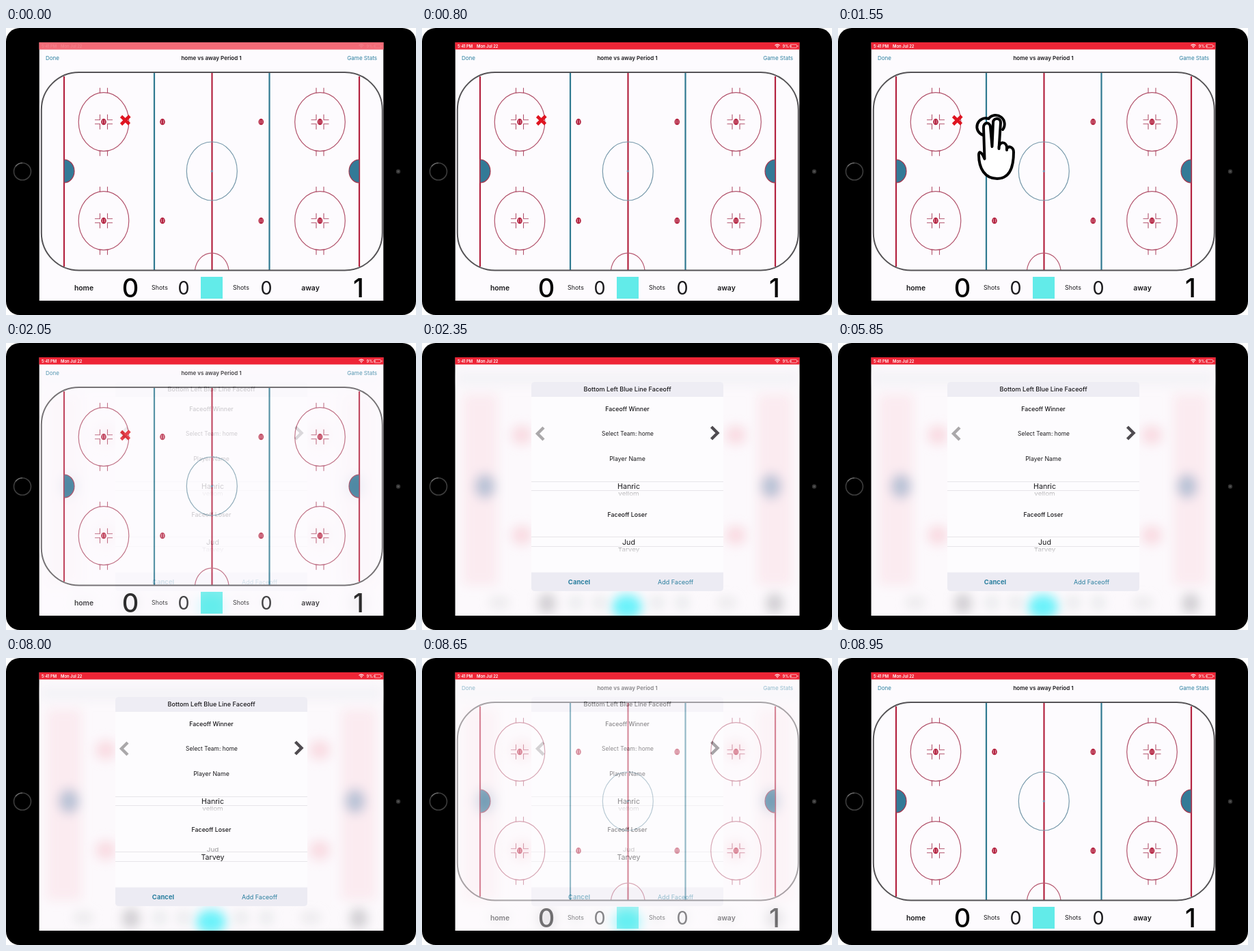
An HTML page for the animation above (9 s loop, 600x421 px).

```html
<!DOCTYPE html>
<html lang="en">
<head>
<meta charset="utf-8">
<title>Hockey faceoff tracker</title>
<style>
html, body { margin: 0; width: 100%; height: 100%; overflow: hidden; background: #fff; }
svg { display: block; width: 600px; height: 421px; }
text { font-family: Inter, Roboto, "Open Sans", sans-serif; }
.line { fill: none; }
</style>
</head>
<body>
<svg viewBox="0 0 600 421">
  <defs>
    <filter id="soft" x="-50%" y="-50%" width="200%" height="200%"><feGaussianBlur stdDeviation="8"/></filter>
    <linearGradient id="fade" x2="0" y2="1">
      <stop offset="0" stop-color="#fdfcfe" stop-opacity="0"/>
      <stop offset="1" stop-color="#fdfcfe"/>
    </linearGradient>
    <clipPath id="screen"><rect x="48.5" y="21" width="504" height="379"/></clipPath>
    <clipPath id="wheel1"><rect x="160" y="193" width="281" height="34"/></clipPath>
    <clipPath id="wheel2"><rect x="160" y="275" width="281" height="34"/></clipPath>
  </defs>

  <!-- tablet -->
  <rect width="600" height="421" rx="20"/>
  <circle cx="24" cy="210.5" r="12.5" class="line" stroke="#3d3d3d" stroke-width="1.6"/>
  <path d="M14 203A12.5 12.5 0 0 1 24 198" class="line" stroke="#777" stroke-width="1.2"/>
  <circle cx="574" cy="210.5" r="3.2" fill="#333"/>
  <circle cx="574" cy="210.5" r="1.4" fill="#555"/>

  <g clip-path="url(#screen)">
    <rect x="48.5" y="21" width="504" height="379" fill="#fdfbfe"/>
    <g id="game">
      <g id="rink" class="line"></g>
      <g id="miss" stroke="#df1420" stroke-width="4.6">
        <path d="M168.5 129.5L180.5 141M181 129L168.5 141.5"/>
      </g>
      <rect x="285" y="365" width="32" height="32" fill="#62ebe9"/>
    </g>

    <g id="hand" stroke="#000" stroke-width="4" fill="#fff" stroke-linejoin="round" stroke-linecap="round">
      <path class="line" d="M212 157A12 12 0 1 1 220 133M220.5 133A12.5 12.5 0 1 1 241 149"/>
      <path d="M214.5 192L213 146C213 138 222 137 223 145L225.5 174L227 139C227 131 238 131 238 139L235.5 177V174C238 166 245 167 247 174V179V177C250 172 257 175 257 182C257 208 249 221 233 221C215 221 206 206 206 186C206 180 210 181 214.5 192Z"/>
    </g>

    <g id="modal">
      <rect x="48.5" y="31" width="504" height="369" fill="#fcf9fc"/>
      <g id="glow" filter="url(#soft)"></g>
      <rect x="160" y="57" width="281" height="307" rx="5" fill="#fdfcfe"/>
      <path d="M160 79V62q0-5 5-5H436q5 0 5 5V79Z" fill="#eeedf4"/>
      <path d="M160 336.500V359q0 5 5 5H436q5 0 5-5V336.500Z" fill="#ecebf3"/>
      <path d="M178 124L169 133L178 142" class="line" stroke="#aaa8aa" stroke-width="4.4"/>
      <path d="M423.500 123L432.500 132L423.500 141" class="line" stroke="#4f4b50" stroke-width="4.4"/>
      <path d="M160 203.500H441M160 216.500H441M160 284.500H441M160 298.500H441" stroke="#e2e0e4" stroke-width=".8"/>
      <g id="labels"></g>
      <g id="winner" clip-path="url(#wheel1)"></g>
      <g id="loser" clip-path="url(#wheel2)"></g>
      <rect x="161" y="217" width="279" height="11" fill="url(#fade)"/>
      <rect x="161" y="299" width="279" height="11" fill="url(#fade)"/>
    </g>

    <rect x="48.5" y="21" width="504" height="10.500" fill="#ee2536"/>
    <g id="status">
      <g class="line" stroke="#fff">
        <path d="M516.500 25.500Q520 22.700 523.500 25.500M518 27.100Q520 25.500 522 27.100" stroke-width="1.100"/>
        <rect x="538.500" y="24.300" width="10" height="4.600" rx="1.200" stroke-width=".6"/>
        <path d="M540 25.300V28M550 25.800V27.400" stroke-width=".9"/>
      </g>
      <circle cx="520" cy="28.500" r=".8" fill="#fff"/>
    </g>
    <rect id="veil" x="48.500" y="21" width="504" height="10.500" fill="#fff"/>
  </g>
</svg>
<script>
const LOOP = 9000, INK = '#1a191c', LINK = '#2b7f9f', RED = '#b3223f', BLUE = '#2f7990';
const $ = id => document.getElementById(id);

function add(parent, tag, attrs) {
  const el = document.createElementNS('http://www.w3.org/2000/svg', tag);
  for (const k in attrs) el.setAttribute(k, attrs[k]);
  return $(parent).appendChild(el);
}
// y is the middle of the capitals
function label(parent, str, x, y, size, weight = 400, fill = INK, anchor = 'middle') {
  const el = add(parent, 'text', { x, y: y + size * .363, fill, 'font-size': size, 'font-weight': weight, 'text-anchor': anchor });
  el.textContent = str;
  return el;
}
const line = (d, stroke, width) => add('rink', 'path', { d, stroke, 'stroke-width': width });
const ring = (cx, cy, rx, ry, stroke, width = 1.2) =>
  add('rink', 'ellipse', { cx, cy, rx, ry, stroke, 'stroke-width': width });

function spot(x, y) {
  add('rink', 'ellipse', { cx: x, cy: y, rx: 3.8, ry: 4.6, fill: RED });
  line(`M${x - 1.5} ${y - 2.5}v5M${x + 1.5} ${y - 2.5}v5`, '#e7b3c0', .8);
}

function drawRink() {
  for (const x of [85, 517]) line(`M${x} 71V350`, RED, 2.2);
  for (const x of [217, 385.5]) line(`M${x} 65V355`, BLUE, 2.2);
  line('M301.500 65V355', RED, 2.2);
  ring(301.3, 210, 37, 43, '#7799ab');
  add('rink', 'circle', { cx: 301.3, cy: 210, r: 1.6, fill: '#6d9ab8' });
  line('M276.500 355A25 29 0 0 1 326 355', '#b75a72', 1.2);
  for (const [x, dir] of [[85, 1], [517, -1]])
    add('rink', 'path', {
      d: `M${x} 193A${15} 17 0 0 ${dir > 0 ? 1 : 0} ${x} 227Z`,
      fill: '#337a97', stroke: '#a13850', 'stroke-width': 1.2
    });
  for (const y of [137.7, 282.7]) {
    for (const x of [143, 459.500]) {
      ring(x, y, 36.8, 43, '#b2536c');
      let d = '';
      for (const sx of [-1, 1]) for (const sy of [-1, 1])
        d += `M${x + sx * 5.5} ${y + sy * 42}v${sy * 8}` +
             `M${x + sx * 13} ${y + sy * 3}h${-sx * 7.5}v${sy * 8}`;
      line(d, '#b2536c', 1.1);
      spot(x, y);
    }
    for (const x of [229, 373.3]) spot(x, y);
  }
  add('rink', 'rect', { x: 51.8, y: 65, width: 499, height: 290.500, rx: 55, stroke: '#555356', 'stroke-width': 2 });
}

function drawGlow() {
  const blob = (cx, cy, rx, ry, fill, opacity) => add('glow', 'ellipse', { cx, cy, rx, ry, fill, opacity });
  for (const x of [60, 491])
    add('glow', 'rect', { x, y: 75, width: 50, height: 280, fill: '#fbe4ea', opacity: .65 });
  add('glow', 'rect', { x: 50, y: 42, width: 500, height: 20, fill: '#eeeef4', opacity: .6 });
  for (const x of [146, 459]) for (const y of [135, 282]) blob(x, y, 15, 14, '#f7cbd4', .65);
  for (const x of [92, 511]) blob(x, 210, 15, 18, '#a9b8d0', .8);
  for (const x of [113, 446]) blob(x, 381, 15, 8, '#dedde0', .6);
  for (const x of [183, 516]) blob(x, 382, 13, 15, '#bdbcc0', .7);
  for (const x of [225, 260, 344, 381]) blob(x, 381, 10, 10, '#d5dcdf', .55);
  blob(300, 387, 22, 18, '#62f2fa', .95);
}

function drawText() {
  label('game', 'Done', 58, 44, 8, 400, LINK, 'start');
  label('game', 'home vs away Period 1', 300.5, 44, 8.05, 600);
  label('game', 'Game Stats', 543, 44, 8.05, 400, LINK, 'end');
  label('game', 'home', 114, 381.500, 10.4, 600);
  label('game', 'away', 445.500, 381.500, 10.4, 600);
  label('game', 'Shots', 225, 381, 8.9);
  label('game', 'Shots', 344, 381, 8.9);
  label('game', '0', 182, 381.500, 38, 500, '#000');
  label('game', '1', 516, 381.500, 38, 500, '#000');
  label('game', '0', 260, 381.500, 27);
  label('game', '0', 381, 381.500, 27);

  label('labels', 'Bottom Left Blue Line Faceoff', 300.5, 68, 9.15, 500);
  label('labels', 'Faceoff Winner', 300.5, 97, 8.8, 500);
  label('labels', 'Select Team: home', 301, 132.500, 8.4);
  label('labels', 'Player Name', 300.5, 169.500, 8.8);
  label('labels', 'Faceoff Loser', 300.5, 251.500, 8.8, 500);
  label('labels', 'Cancel', 230, 350.500, 9.5, 700, LINK);
  label('labels', 'Add Faceoff', 371, 350.500, 9, 400, LINK);

  label('status', '5:41 PM', 52, 26.500, 5.8, 600, '#fff', 'start');
  label('status', 'Mon Jul 22', 80, 26.500, 5.9, 600, '#fff', 'start');
  label('status', '9%', 537, 26.500, 5.8, 500, '#fff', 'end');
}

// Rows of a picker wheel turn away and fade as they leave the middle
function wheel(id, names, y) {
  const rows = names.map(n => label(id, n, 0, 0, 10.7));
  return pos => rows.forEach((row, i) => {
    const d = i - pos, far = Math.min(Math.abs(d), 1);
    row.setAttribute('transform', `translate(302.500 ${y + 11 * d}) scale(${1 - .08 * far} ${1 - .25 * far})`);
    row.setAttribute('opacity', 1 - .55 * far);
  });
}

const ramp = (t, a, b) => {
  const k = Math.min(1, Math.max(0, (t - a) / (b - a)));
  return k * k * (3 - 2 * k);
};
const pulse = (t, a, b, c, d) => ramp(t, a, b) - ramp(t, c, d);
const show = (id, opacity) => $(id).setAttribute('opacity', opacity);

drawRink();
drawGlow();
drawText();
const turnWinner = wheel('winner', ['Hanric', 'vellom'], 210);
const turnLoser = wheel('loser', ['Jud', 'Tarvey'], 292);
turnWinner(0);

function frame() {
  const t = performance.now() % LOOP;
  const bar = ramp(t, -150, 450);
  show('veil', .38 * (1 - bar));
  show('status', bar);
  show('miss', t < 4000 ? 1 : 0);
  show('hand', pulse(t, 1000, 1250, 1800, 1980));
  show('modal', pulse(t, 1950, 2300, 8450, 8850));
  turnLoser(ramp(t, 7100, 7800));
  requestAnimationFrame(frame);
}
frame();
</script>
</body>
</html>
```
